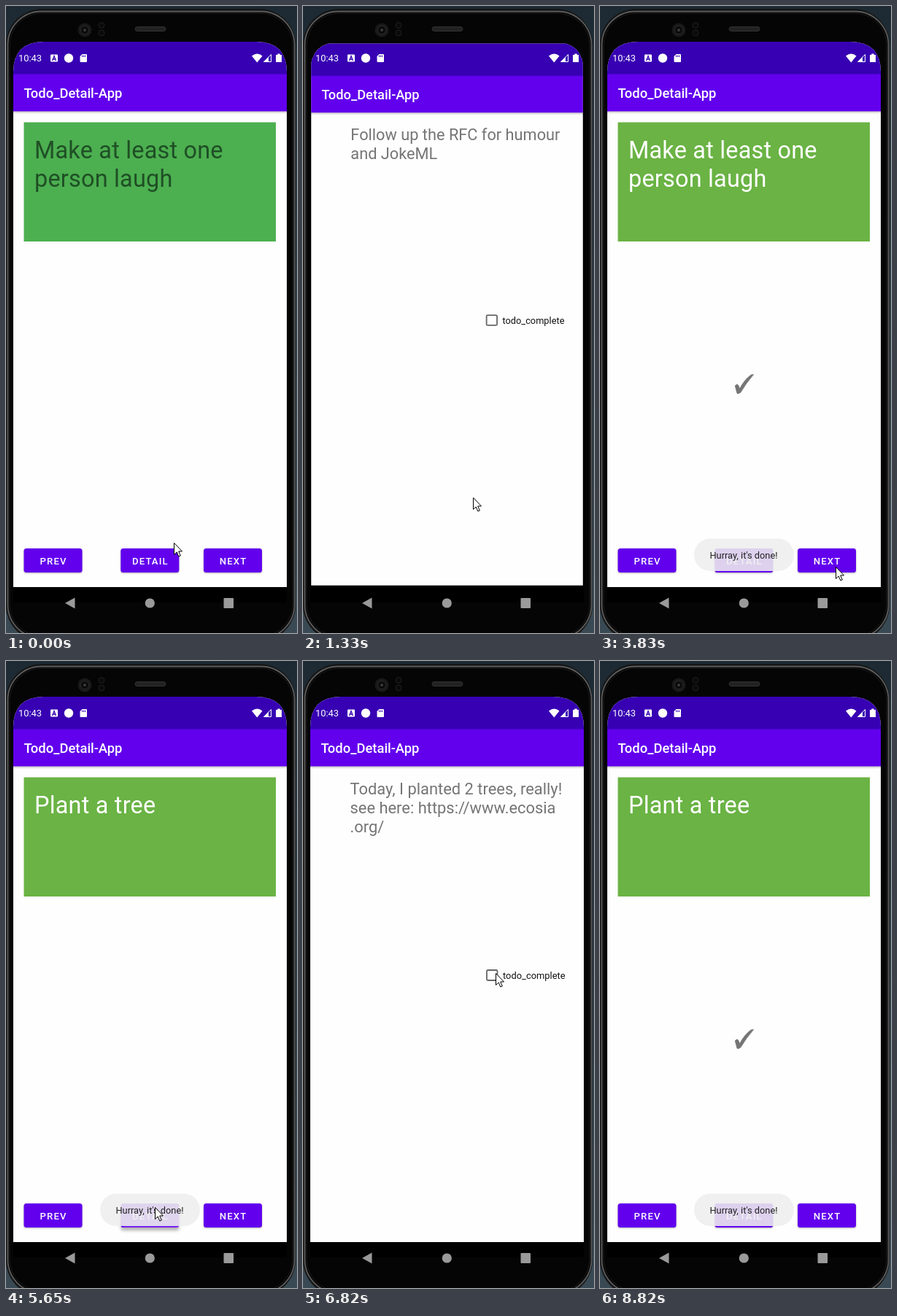
An HTML page for the animation above (9250 ms loop, 399x860 px).

```html
<!DOCTYPE html>
<html lang="en">
<head>
<meta charset="utf-8">
<title>Todo app</title>
<style>
  html, body { margin: 0; width: 100%; height: 100%; overflow: hidden; background: #141c22; }
  svg { display: block; width: 399px; height: 860px; font-family: Roboto, sans-serif; }
  text { white-space: pre; }
  .title { font-size: 18.4px; font-weight: 500; fill: #fff; }
  .headline { font-size: 32.4px; letter-spacing: .22px; }
  .body { font-size: 21.9px; fill: #757575; }
  .small { font-size: 12.9px; }
  .button { font-size: 13.1px; font-weight: 500; letter-spacing: 1.15px; fill: #fff; text-anchor: middle; }
</style>
</head>
<body>
<svg viewBox="0 0 399 860">
  <defs>
    <clipPath id="screen"><path d="M10 818V91Q10 49 52 49H343Q385 49 385 91V818Z"/></clipPath>
    <linearGradient id="desk" x2="0" y2="1">
      <stop stop-color="#1d2a33"/><stop offset="1" stop-color="#3a4a54"/>
    </linearGradient>
    <linearGradient id="shade" x2="0" y2="1">
      <stop stop-color="#000" stop-opacity=".22"/><stop offset="1" stop-color="#000" stop-opacity="0"/>
    </linearGradient>
    <g id="window">
      <path fill="#fefefe" d="M10 49H385V797H10Z"/>
      <path fill="#3700b3" d="M10 49H385V94H10Z"/>
      <path fill="#6200ee" d="M10 93.500H385V144.500H10Z"/>
      <path fill="url(#shade)" d="M10 144.500H385V148H10Z"/>
      <text class="title" x="24.500" y="126">Todo_Detail-App</text>
    </g>
  </defs>

  <!-- phone body -->
  <rect width="399" height="860" fill="url(#desk)"/>
  <rect x="0" y="4" width="397" height="867" rx="49" fill="#161616"/>
  <rect x="2.500" y="7.500" width="393" height="859.500" rx="46" fill="#050505" stroke="#5c5c5c" stroke-width="1.800"/>
  <rect x="5" y="10" width="388" height="854.500" rx="44" fill="none" stroke="#1c1c1c"/>
  <circle cx="108" cy="33" r="9.500" fill="#191919"/>
  <circle cx="108" cy="33" r="5.500" fill="#0a0a0a" stroke="#2c2c2c"/>
  <circle cx="108" cy="33" r="2" fill="#3a3a3a"/>
  <g fill="#0a0a0a" stroke="#202020"><circle cx="131" cy="26.500" r="4"/><circle cx="131" cy="37" r="4"/></g>
  <rect x="177" y="28.500" width="42" height="6" rx="3" fill="#222" stroke="#303030"/>

  <g clip-path="url(#screen)">
    <path d="M10 49H385V818H10Z"/>
    <g id="list">
      <use href="#window"/>
      <path id="card" d="M24.500 159.500H370V323H24.500Z"/>
      <g id="task" class="headline"></g>
      <path id="mark" fill="#757575" stroke="#757575" stroke-width=".9" d="M185.300 521Q188 517.500 189.800 520.500L191.500 525Q198 512.500 207 506L210.500 505.500Q200.500 517 192.800 530Q190 532.300 188 531.300Z"/>
      <g id="buttons"></g>
    </g>
    <g id="detail">
      <use href="#window"/>
      <g id="note" class="body"></g>
      <circle id="halo" cx="259" cy="431" fill="#000"/>
      <rect id="box" x="252" y="424" width="14.500" height="14" rx="1.500" stroke-width="1.800"/>
      <path id="tick" d="M254.500 431l3.300 3.500 6.500-7" fill="none" stroke="#fff" stroke-width="2"/>
      <text class="small" x="274" y="436" fill="#111">todo_complete</text>
    </g>
  </g>

  <!-- status bar -->
  <g fill="#fff">
    <text class="small" x="17" y="76">10:43</text>
    <rect x="61" y="66.500" width="10" height="10" rx="1"/>
    <path d="M63.500 75l2.500-6.500 2.500 6.500M64.500 73h3" fill="none" stroke="#3700b3" stroke-width="1.300"/>
    <circle cx="86" cy="71.500" r="6.200"/>
    <path d="M104.500 66H110Q111 66 111 67V76Q111 77 110 77H102.500Q101.500 77 101.500 76V69Z"/>
    <path d="M104.500 67.500v2.500M106.500 67.500v2.500M108.500 67.500v2.500" stroke="#3700b3"/>
    <path d="M337 68.500Q344.500 62.500 351.500 68.500L344.300 77.500Z"/>
    <path d="M353.500 76.500L363.500 66.500V76.500Z" fill="none" stroke="#fff"/>
    <path d="M353 77L360 70V77Z"/>
    <path d="M370 67H372.300V65.500H375.700V67H378V77H370Z"/>
  </g>

  <g id="toast">
    <rect x="129" y="730.500" width="137" height="44.500" rx="22" fill="#eee" fill-opacity=".88"/>
    <text x="197" y="758" text-anchor="middle" font-size="12.800" fill="#222">Hurray, it's done!</text>
  </g>

  <g fill="#9a9a9a">
    <path d="M81 819L94.500 811.500V826.500Z"/>
    <circle cx="197.300" cy="819" r="6.600"/>
    <rect x="298.500" y="812" width="13.500" height="14" rx="1"/>
  </g>

  <path id="cursor" d="M.5 .5V16.500L4.200 13L6.800 19L9.300 18L6.700 12H11.500Z" fill="#fff" stroke="#000"/>
</svg>
<script>
const LOOP = 9250;
const $ = id => document.getElementById(id);
const clamp = v => Math.max(0, Math.min(1, v));
const set = (id, attrs) => { for (const k in attrs) $(id).setAttribute(k, attrs[k]); };

const runs = [[0, 0, 1], [150, 540, 4], [820, 1330, 5], [1480, 1840, 4], [1990, 2780, 6],
  [2900, 3050, 2], [3320, 3830, 5], [4260, 5280, 9], [5400, 5650, 3], [5770, 6430, 5],
  [6550, 6820, 3], [7190, 8120, 8], [8270, 8270, 1], [8670, 8820, 2]];
const steps = runs.flatMap(([a, b, n]) =>
  Array.from({ length: n }, (_, i) => a + (n > 1 ? (b - a) * i / (n - 1) : 0)));

// Cursor path: [time, x, y]
const path = [[0, 230, 736], [540, 213, 750], [1080, 213, 750], [1330, 233, 674], [1840, 260, 433],
  [3190, 260, 433], [3830, 323, 769], [4380, 323, 769], [5280, 204, 749], [5770, 204, 749],
  [6430, 278, 523], [6820, 264, 428], [7600, 264, 428], [8120, 298, 749], [8270, 322, 835],
  [8540, 322, 835], [8670, 330, 848], [8820, 334, 880], [LOOP, 334, 880]];

// Each visit to the detail page: when it opens, is ticked and closes.
const visits = [{ open: 930, tick: 1990, close: 2630 }, { open: 5700, tick: 7190, close: 7525 }];
const presses = [[820, "DETAIL", 213, 750], [4260, "NEXT", 323, 769], [5400, "DETAIL", 204, 749]];
const swap = 4380;

const buttons = { PREV: 24.5, DETAIL: 157.3, NEXT: 271 };
$("buttons").innerHTML = Object.entries(buttons).map(([name, x]) => `
  <clipPath id="clip${name}"><rect x="${x}" y="744" width="80" height="33" rx="3.500"/></clipPath>
  <rect id="${name}" x="${x}" y="744" width="80" height="33" rx="3.500" fill="#6200ee"/>
  <circle id="ripple${name}" clip-path="url(#clip${name})" fill="#fff"/>
  <text class="button" x="${x + 40.6}" y="765.500">${name}</text>`).join("");

function lines(id, rows, x, y, gap) {
  const html = rows.map((row, i) => `<text x="${x}" y="${y + i * gap}">${row}</text>`).join("");
  if ($(id).dataset.rows !== html) $(id).innerHTML = $(id).dataset.rows = html;
}

function scale(id, s) {
  set(id, { transform: `translate(197.5 431) scale(${s}) translate(-197.5 -431)` });
}

function pages(t) {
  const visit = visits.find(v => t >= v.open && t < v.close + 450);
  let alpha = 0, listScale = 1;
  if (visit) {
    const p = clamp((t - visit.open) / 520), q = clamp((t - visit.close) / 450);
    alpha = q > 0 ? clamp(1 - 4 * q) : clamp(2 * p);
    listScale = q > 0 ? 1 + .1 * (1 - q) ** 3.3 : 1 + .1 * p;
    scale("detail", 1 - .12 * (1 - p) ** 2 - .1 * q);

    const h = (t - visit.tick) / 700, on = t > visit.tick + 300;
    set("halo", { r: 10 + 10 * clamp(h * 3), opacity: h >= 0 ? .12 * clamp(2 - 2 * h) : 0 });
    set("box", { fill: on ? "#03dac5" : "none", stroke: on ? "#03dac5" : "#666" });
    set("tick", { opacity: +on });
  }
  scale("list", listScale);
  set("list", { visibility: alpha < 1 ? "visible" : "hidden" });
  set("detail", { opacity: alpha });
}

function content(t) {
  const second = t >= swap, done = t >= visits[0].close;
  const marked = second ? t >= visits[1].close : done;
  set("card", { fill: done ? "#6ab344" : "#4caf50" });
  set("task", { fill: done ? "#fff" : "#1f4f25" });
  set("mark", { opacity: +marked });
  lines("task", second ? ["Plant a tree"] : ["Make at least one", "person laugh"], 39, 209, 39);
  lines("note", second
    ? ["Today, I planted 2 trees, really!", "see here: https://www.ecosia", ".org/"]
    : ["Follow up the RFC for humour", "and JokeML"], 64.5, 182.5, 26);
}

function ripples(t) {
  for (const name in buttons) {
    const press = presses.find(([at, label]) => label === name && t >= at && t < at + 500);
    const p = press ? (t - press[0]) / 500 : 1;
    const lift = press ? 1 : 0;
    set("ripple" + name, { cx: press ? press[2] : 0, cy: press ? press[3] : 0,
      r: 10 + 80 * p, opacity: .26 * (1 - p) });
    $(name).style.filter = `drop-shadow(0 ${1 + 3 * lift}px ${1 + lift}px rgba(0,0,0,.3))`;
  }
}

function draw(now) {
  const time = now % LOOP;
  const t = steps.findLast(s => s <= time + .01);
  pages(t);
  content(t);
  ripples(t);

  const shown = clamp((t - 2635) / 250) - clamp((t - 6080) / 250) + clamp((t - 7545) / 250);
  set("toast", { opacity: shown });

  const i = path.findIndex(k => k[0] > t), [t0, x0, y0] = path[i - 1], [t1, x1, y1] = path[i];
  const f = (t - t0) / (t1 - t0);
  set("cursor", { transform: `translate(${x0 + (x1 - x0) * f} ${y0 + (y1 - y0) * f})` });
}

const start = performance.now();
function frame() {
  draw(performance.now() - start);
  requestAnimationFrame(frame);
}
frame();
</script>
</body>
</html>
```
